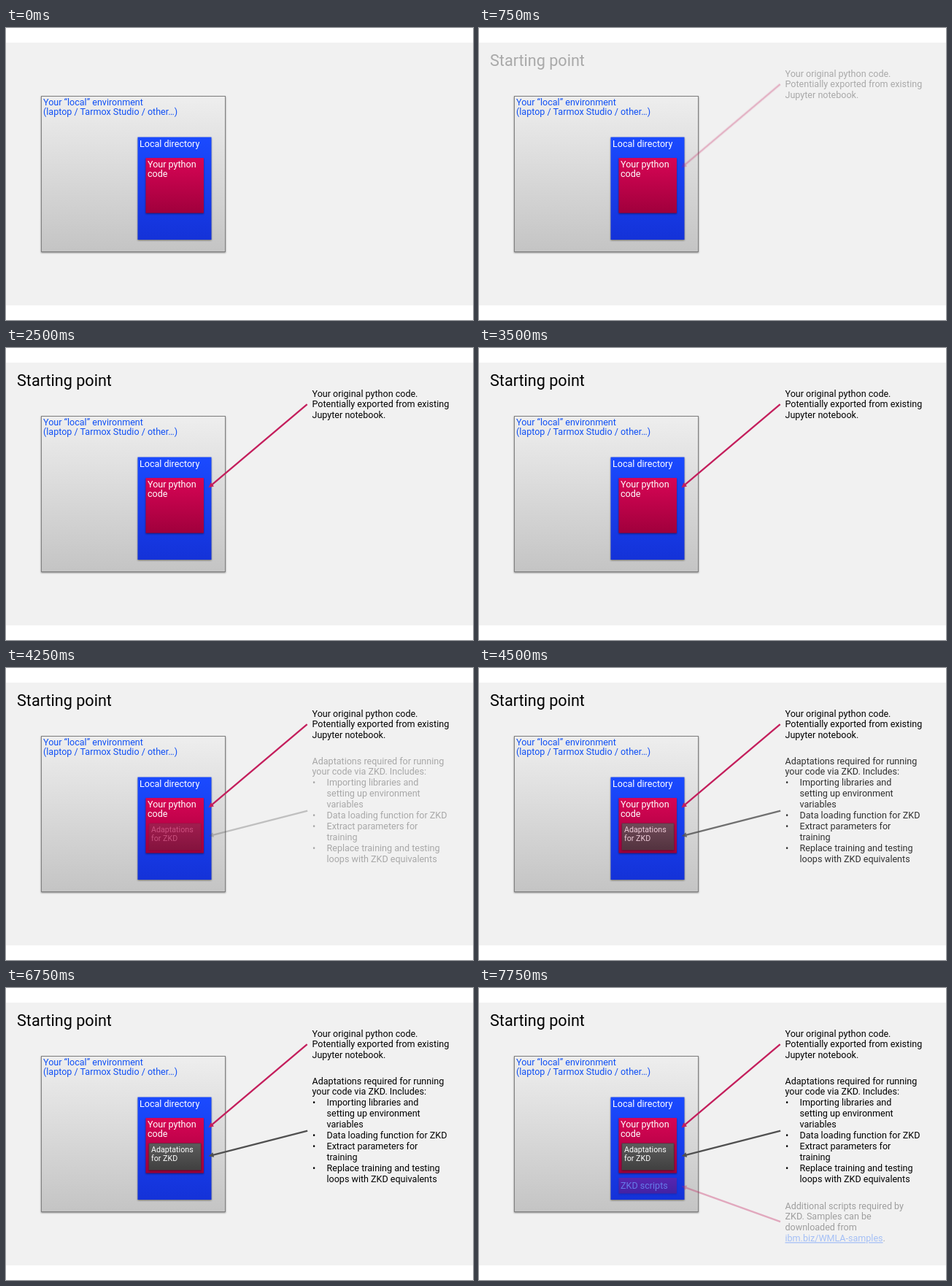
An HTML page for the animation above (8000 ms loop, 640 by 400 pixels).

```html
<!DOCTYPE html>
<html lang="en">
<head>
<meta charset="utf-8">
<title>Starting point</title>
<style>
  html, body { margin: 0; width: 100%; height: 100%; overflow: hidden; background: #fff; }
  svg { display: block; width: 640px; height: 400px; font: 12.55px Roboto, Arial, sans-serif; }
  .box { filter: drop-shadow(0 1px 1px #0007); }
  .arrow path { stroke-width: 2.3; }
  .step { opacity: 0; }
</style>
</head>
<body>
<svg viewBox="0 0 640 400">
  <defs>
    <linearGradient id="grey" x2="0" y2="1"><stop stop-color="#eee"/><stop offset="1" stop-color="#c4c4c4"/></linearGradient>
    <linearGradient id="blue" x2="0" y2="1"><stop stop-color="#1a4aff"/><stop offset="1" stop-color="#1432d8"/></linearGradient>
    <linearGradient id="red" x2="0" y2="1"><stop stop-color="#d80555"/><stop offset="1" stop-color="#a0003c"/></linearGradient>
    <linearGradient id="dark" x2="0" y2="1"><stop stop-color="#5c5c5c"/><stop offset="1" stop-color="#404040"/></linearGradient>
  </defs>

  <rect y="20" width="640" height="360" fill="#f1f1f1"/>
  <rect class="box" x="48.5" y="93.5" width="252" height="213" fill="url(#grey)" stroke="#808080"/>
  <text fill="#1050f5" data-x="51" data-y="106" data-gap="13.3">Your “local” environment|(laptop / Tarmox Studio / other…)</text>
  <rect class="box" x="180.5" y="149.5" width="101" height="140.5" fill="url(#blue)"/>
  <text fill="#fff" data-x="183" data-y="163">Local directory</text>
  <rect class="box" x="191.5" y="178" width="79.5" height="75.5" fill="url(#red)"/>
  <text fill="#fff" data-x="194" data-y="190.5" data-gap="13.3">Your python|code</text>

  <g class="step">
    <text data-x="15" data-y="52.3" font-size="21.6">Starting point</text>
    <text data-x="419.5" data-y="66.5">Your original python code.|Potentially exported from existing|Jupyter notebook.</text>
    <g class="arrow" transform="translate(277.5 191.3) rotate(-40.2)" fill="#c41e5c" stroke="#c41e5c">
      <path d="M6 0H177"/><path d="M0 0l7-3.4v6.8z" style="stroke:none"/>
    </g>
  </g>

  <g class="step">
    <rect class="box" x="196" y="213" width="71" height="36" fill="url(#dark)" stroke="#484848" stroke-width=".8"/>
    <text fill="#fff" data-x="199" data-y="225" data-gap="11.6" font-size="10.7">Adaptations|for ZKD</text>
    <text data-x="419.5" data-y="131.5">Adaptations required for running|your code via ZKD. Includes:</text>
    <text data-x="439.5" data-y="161.3">Importing libraries and|setting up environment|variables|Data loading function for ZKD|Extract parameters for|training|Replace training and testing|loops with ZKD equivalents</text>
    <text data-x="420" data-y="161.3">•|||•|•||•</text>
    <g class="arrow" transform="translate(277.5 230.3) rotate(-14.3)" fill="#505050" stroke="#505050">
      <path d="M6 0H140"/><path d="M0 0l7-3.4v6.8z" style="stroke:none"/>
    </g>
  </g>

  <g class="step">
    <rect class="box" x="191.5" y="260" width="79.5" height="21.5" fill="url(#red)"/>
    <text fill="#fff" data-x="194" data-y="274.5">ZKD scripts</text>
    <text data-x="419.5" data-y="302.5">Additional scripts required by|ZKD. Samples can be|downloaded from</text>
    <text x="419.5" y="347.2"><tspan fill="#1060ff" text-decoration="underline">ibm.biz/WMLA-samples</tspan>.</text>
    <g class="arrow" transform="translate(277.5 271.3) rotate(19.8)" fill="#c41e5c" stroke="#c41e5c">
      <path d="M6 0H144"/><path d="M0 0l7-3.4v6.8z" style="stroke:none"/>
    </g>
  </g>
</svg>
<script>
  const LOOP = 8000, TICK = 250, FADE = 500;
  const starts = [600, 4100, 7580];
  const steps = document.querySelectorAll('.step');

  // Break "a|b|c" into one positioned line each.
  for (const text of document.querySelectorAll('text[data-x]')) {
    const { x, y, gap = 14.9 } = text.dataset;
    const lines = text.textContent.split('|');
    text.textContent = '';
    lines.forEach((line, i) => {
      const span = document.createElementNS('http://www.w3.org/2000/svg', 'tspan');
      span.setAttribute('x', x);
      span.setAttribute('y', +y + i * gap);
      span.textContent = line;
      text.append(span);
    });
  }

  // The picture advances four times a second.
  function draw(now) {
    const time = Math.floor(now % LOOP / TICK) * TICK;
    steps.forEach((step, i) => {
      step.style.opacity = Math.min(1, Math.max(0, (time - starts[i]) / FADE));
    });
    requestAnimationFrame(draw);
  }
  draw(performance.now());
</script>
</body>
</html>
```
